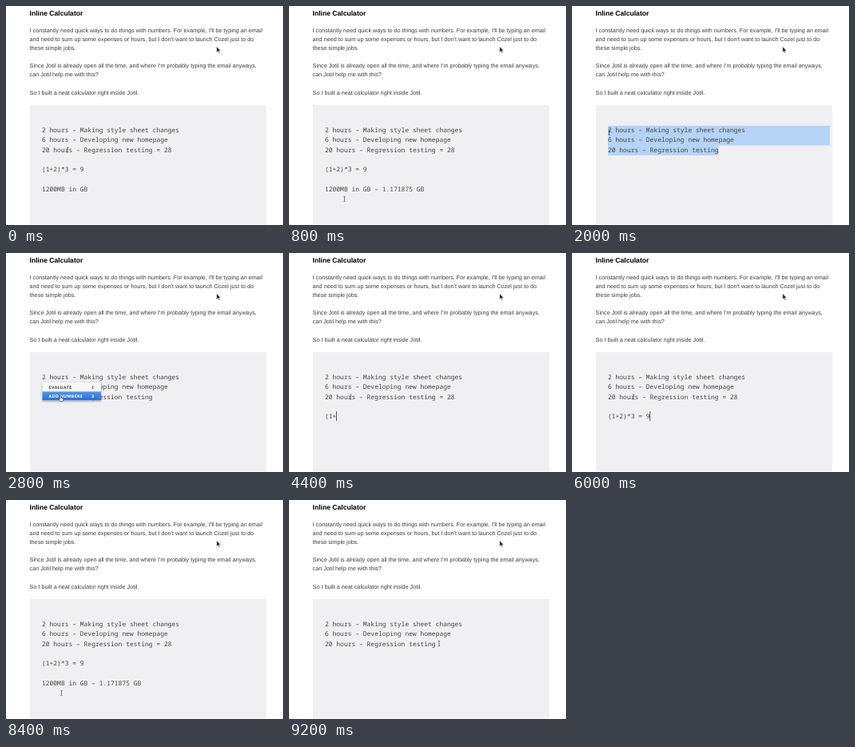
Write an HTML page that moves like this. It is 347 px wide and 274 px high and loops after 9.6 s.

```html
<!DOCTYPE html>
<html lang="en">
<head>
<meta charset="utf-8">
<title>Inline Calculator</title>
<style>
html, body { margin: 0; width: 100%; height: 100%; overflow: hidden; background: #fff; }
svg { display: block; }
text { white-space: pre; text-rendering: geometricPrecision; }
.prose { font: 7.22px "Liberation Sans", Arial, sans-serif; fill: #3c3c3c; }
.title { font: bold 8.6px "Liberation Sans", Arial, sans-serif; fill: #000; }
.code { font: 7.97px "Noto Sans Mono", monospace; fill: #444; }
.menu { font: 900 5px Lato, sans-serif; letter-spacing: .5px; fill: #444; }
.menu.on { fill: #fff; }
</style>
</head>
<body>
<svg width="347" height="274" viewBox="0 0 347 274">
  <defs>
    <linearGradient id="blue" x2="0" y2="1">
      <stop stop-color="#5596e8"/><stop offset="1" stop-color="#2a6fd2"/>
    </linearGradient>
    <filter id="shadow" x="-10%" y="-20%" width="120%" height="150%">
      <feDropShadow dx="0" dy=".8" stdDeviation=".8" flood-opacity=".4"/>
    </filter>
  </defs>
  <text class="title" x="29.5" y="12">Inline Calculator</text>
  <g id="prose" class="prose"></g>
  <path d="M263.9 50.8v7.2l1.6-1.5 1.2 2.6 1.1-.5-1.2-2.5h2.2z" fill="#222" stroke="#fff" stroke-width=".4"/>
  <rect x="30" y="124" width="296" height="149.5" fill="#f0f0f2"/>
  <g id="editor"></g>
</svg>
<script>
const LEFT = 45, CHAR = 4.782, ROW = 12.28, STEP = 400, LOOP = 9600;
const $ = id => document.getElementById(id);
const rowTop = row => 149.8 + row * ROW;
const text = (cls, x, y, s) => `<text class="${cls}" x="${x}" y="${y}">${s}</text>`;
const rect = (x, y, w, h, fill) => `<rect x="${x}" y="${y}" width="${w}" height="${h}" fill="${fill}"/>`;

const prose = [
  "I constantly need quick ways to do things with numbers. For example, I'll be typing an email",
  "and need to sum up some expenses or hours, but I don't want to launch Cozel just to do",
  "these simple jobs.", "",
  "Since Jotil is already open all the time, and where I'm probably typing the email anyways,",
  "can Jotil help me with this?", "",
  "So I built a neat calculator right inside Jotil."
];
$("prose").innerHTML = prose.map((s, i) => text("prose", 29.6, 33.3 + i * 11.03, s)).join("");

const tasks = ["2 hours – Making style sheet changes", "6 hours – Developing new homepage", "20 hours – Regression testing"];
const formula = "(1+2)*3", units = "1200MB in GB";
const rest = [77.2, 180];

// Typing states: the first n characters with the caret behind them
const typeFormula = n => ({ sum: 1, expr: formula.slice(0, n), caret: [n, 4], beam: rest });
const typeUnits = n => ({ sum: 1, expr: formula + " = 9", conv: units.slice(0, n), caret: [n, 6], beam: rest });
const filled = extra => ({ sum: 1, expr: formula + " = 9", conv: units, ...extra });
const converted = units + " – 1.171875 GB";

const steps = [
  filled({ beam: rest }),
  filled({ menu: [6, 0], hand: [68.6, 241] }),
  filled({ conv: converted, beam: [69.5, 241.5] }),
  filled({ conv: converted, beam: [172, 229] }),
  { beam: [188, 179.5] },
  { select: [0, 2], beam: [46.5, 158] },
  { select: [0, 2], menu: [0, -1] },
  { menu: [0, 1], hand: [68.6, 179] },
  { sum: 1, caret: [0, 4], beam: [134, 171] },
  ...[1, 2, 3, 5, 7].map(typeFormula),
  { sum: 1, expr: formula, select: [4, 4], menu: [4, -1], beam: rest },
  { sum: 1, expr: formula + " = 9", caret: [11, 4], beam: rest },
  ...[0, 4, 10, 12].map(typeUnits)
];

function drawMenu(row, active) {
  const y = rowTop(row) + 12.2;
  const items = ["EVALUATE", "ADD NUMBERS"].map((label, i) => {
    const top = y + i * 11.4, cls = i === active ? "menu on" : "menu";
    return (i === active ? rect(LEFT + .5, top, 73.5, 11, "url(#blue)") : "") +
      text(cls, 53.6, top + 7.9, label) + text(cls, 107.2, top + 7.9, i + 1);
  });
  return `<g filter="url(#shadow)">${rect(LEFT + .5, y, 73.5, 22.6, "#f7f7f7")}</g>` + items.join("");
}

const drawBeam = (x, y) =>
  `<path d="M${x - 1.2} ${y - 3.3}l1.2.5 1.2-.5M${x} ${y - 2.8}v5.6m-1.2.5l1.2-.5 1.2.5" fill="none" stroke="#444" stroke-width=".7"/>`;

const drawHand = (x, y) =>
  `<path d="M${x - .8} ${y}q.8-.8 1.6 0v2.2l2.4.7v2l-.8 1.8h-3l-2-3 .6-.6 1.2.8z" fill="#fff" stroke="#222" stroke-width=".6"/>`;

function draw({ sum, expr = "", conv = "", select, menu, caret, beam, hand }) {
  const lines = [...tasks, "", expr, "", conv];
  if (sum) lines[2] += " = 28";
  let out = "";
  if (select) {
    const [first, last] = select;
    for (let r = first; r <= last; r++) {
      const width = r < last ? 278 : lines[r].length * CHAR;
      out += rect(LEFT, rowTop(r), width, ROW + .1, "#b4d3f6");
    }
  }
  out += lines.map((s, r) => text("code", LEFT, rowTop(r) + 8.4, s)).join("");
  if (caret) out += rect(LEFT + caret[0] * CHAR - .2, rowTop(caret[1]) - .8, .8, 12, "#333");
  if (menu) out += drawMenu(...menu);
  if (beam) out += drawBeam(...beam);
  if (hand) out += drawHand(...hand);
  $("editor").innerHTML = out;
}

let shown = -1;
function tick() {
  let step = Math.floor(performance.now() % LOOP / STEP);
  // The loop closes by repeating the conversion
  if (step >= steps.length) step -= steps.length - 1;
  if (step !== shown) draw(steps[shown = step]);
  requestAnimationFrame(tick);
}
tick();
</script>
</body>
</html>
```
